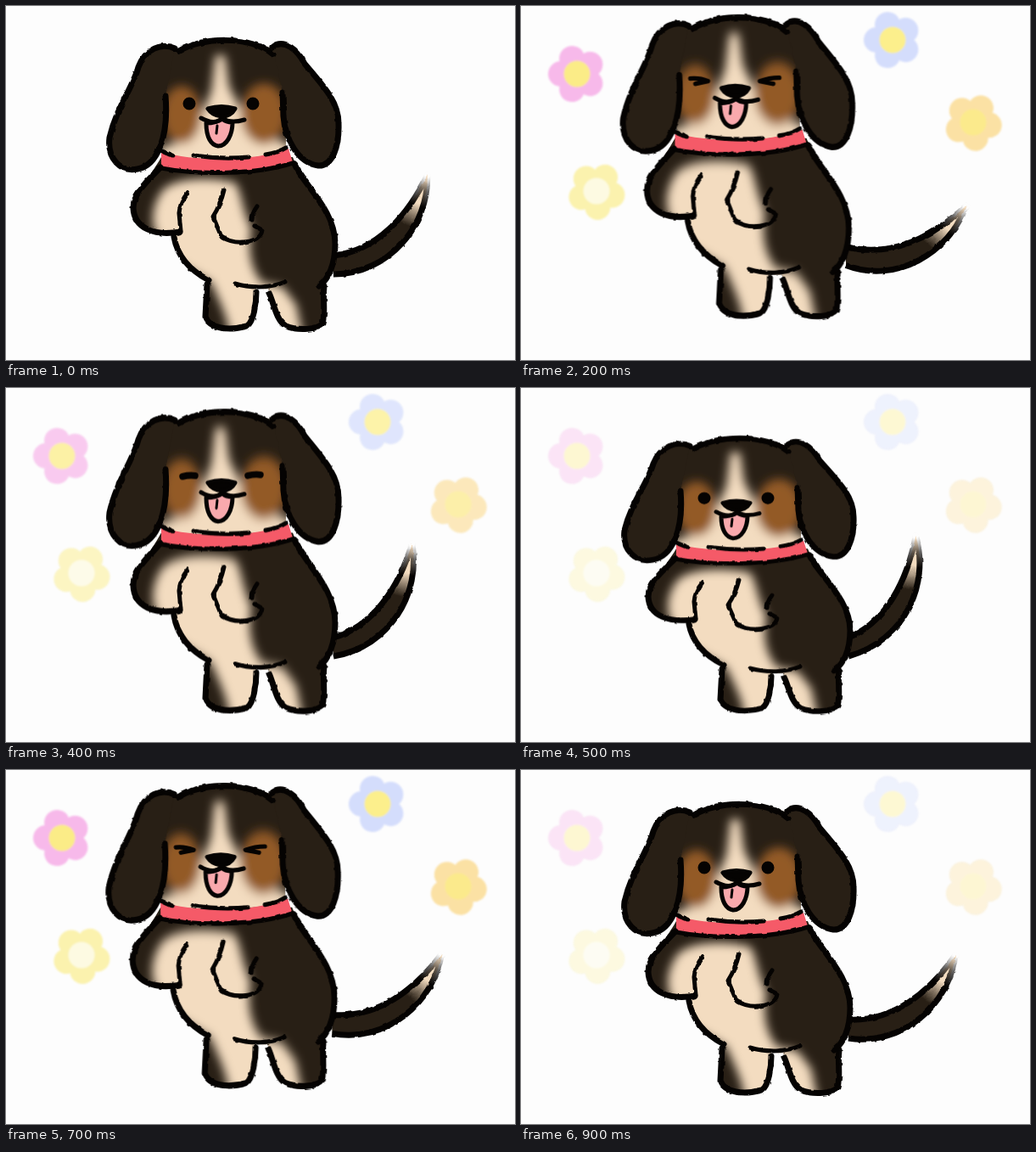
Recreate the animation shown at these times as an HTML page. Size 600 by 417 pixels, loop 1000 ms.

```html
<!DOCTYPE html>
<html lang="en">
<head>
<meta charset="utf-8">
<title>Happy puppy</title>
<style>
  html, body { margin: 0; height: 100%; overflow: hidden; background: #fdfdfd; }
  svg { display: block; width: 100vw; height: 100vh; }
  .ink { fill: none; stroke: #050302; stroke-width: 7; stroke-linecap: round; stroke-linejoin: round; }
  .thin { stroke-width: 5; }
  .dark { fill: #281f15; }
  .cream { fill: #f3dcc0; }
</style>
</head>
<body>
<svg viewBox="0 0 600 417" preserveAspectRatio="none">
  <defs>
    <filter id="rough" x="-10%" y="-10%" width="120%" height="120%" color-interpolation-filters="sRGB">
      <feTurbulence type="fractalNoise" baseFrequency=".12" numOctaves="2" seed="4"/>
      <feDisplacementMap in="SourceGraphic" scale="3" xChannelSelector="R" yChannelSelector="G"/>
    </filter>
    <filter id="soft" x="-30%" y="-30%" width="160%" height="160%"><feGaussianBlur stdDeviation="6"/></filter>
    <filter id="haze"><feGaussianBlur stdDeviation="1"/></filter>
    <radialGradient id="tipFill" gradientUnits="userSpaceOnUse" r="64">
      <stop offset=".55" stop-color="#f3dcc0"/><stop offset="1" stop-color="#281f15"/>
    </radialGradient>
    <radialGradient id="tipInk" gradientUnits="userSpaceOnUse" r="64">
      <stop offset=".05" stop-color="#050302" stop-opacity="0"/>
      <stop offset=".3" stop-color="#050302" stop-opacity=".6"/>
      <stop offset=".6" stop-color="#050302"/>
    </radialGradient>
    <clipPath id="bodyClip"><path id="bodyShape" d="M183 178C168 205 150 220 149 238C150 262 175 272 200 268C202 295 218 312 238 326L235 366C240 380 262 384 284 378C293 372 294 345 295 332Q302 334 309 333C316 350 318 370 330 378C345 384 368 382 374 374C378 360 374 340 376 326C385 310 388 300 388 280C388 240 350 210 338 178Z"/></clipPath>
    <clipPath id="headClip"><path id="headShape" d="M180 64C210 37 290 32 330 58L330 166C320 184 200 184 185 172Z"/></clipPath>
  </defs>

  <g id="flowers" filter="url(#haze)"></g>

  <path id="tail" fill="url(#tipFill)" stroke="url(#tipInk)" stroke-width="7" stroke-linejoin="round" filter="url(#rough)"/>

  <g id="dog">
    <use href="#bodyShape" class="dark"/>
    <g clip-path="url(#bodyClip)">
      <path class="cream" filter="url(#soft)" d="M184 218C198 202 240 201 270 208C278 220 278 240 289 262C284 290 290 312 302 326L326 331L342 352L350 390L264 390C262 366 250 345 242 326L190 296L176 266C170 250 174 232 184 218Z"/>
    </g>

    <use href="#headShape" class="dark"/>
    <g clip-path="url(#headClip)">
      <g filter="url(#soft)" fill="#935a28">
        <path class="cream" d="M247 58H258L263 95L280 128L300 150L340 166V192H180V168L205 160L226 138L242 100Z"/>
        <ellipse cx="207" cy="128" rx="23" ry="34"/>
        <ellipse cx="304" cy="127" rx="27" ry="36"/>
      </g>
    </g>

    <path fill="#f55a68" d="M183 172C225 184 295 183 333 168L338 184C295 199 225 199 183 190Z"/>

    <g filter="url(#rough)">
      <g class="ink">
        <path class="dark" d="M199 50C184 43 164 50 156 72C150 95 130 120 122 155C119 180 135 196 155 192C178 188 192 155 188 106"/>
        <path class="dark" d="M314 48C328 38 344 52 352 68C375 95 392 113 392 138C393 165 385 189 368 188C345 185 329 158 327 130L326 102"/>
        <path d="M204 53C230 37 286 34 315 57"/>
        <path d="M182 190C168 205 150 220 150 238C151 262 175 271 205 266M198 272C202 295 218 312 239 323"/>
        <path d="M237 328L235 366C240 380 262 383 284 377C292 372 295 350 295 337M310 338C316 350 318 370 330 377C345 383 368 381 373 374C377 360 373 345 375 330"/>
        <path d="M340 186C350 210 388 240 388 280C388 305 380 322 369 330"/>
      </g>
      <g class="ink thin">
        <path d="M183 191C225 199 295 199 338 185M221 176Q255 181 286 178M306 175Q320 173 330 167M182 170L196 176"/>
        <path d="M214 220Q205 231 204 244L206 265M257 217Q253 234 244 248L254 272C270 282 300 280 302 264L293 259M296 236Q290 244 290 252M270 327C290 333 312 332 329 325"/>
      </g>
    </g>

    <g class="ink thin">
      <path fill="#f9a9ad" d="M236 138C236 155 242 164 250 165C260 165 267 152 267 137Q259 137 255 133Q248 138 236 138Z"/>
      <path d="M230 132Q246 141 255 132Q264 139 281 134"/>
      <path d="M249 141L248 150" stroke-width="3"/>
      <path fill="#050302" d="M238 121Q254 116 270 121Q265 130 254 130Q243 129 238 121Z"/>
      <path id="eyes"/>
    </g>
  </g>
</svg>

<script>
const $ = id => document.getElementById(id);
const ground = 383;

function flower(x, y, turn, petal, middle) {
  let out = "";
  for (let a = turn; a < turn + 360; a += 72) {
    out += `<circle cx="19" r="15" fill="${petal}" transform="translate(${x} ${y}) rotate(${a})"/>`;
  }
  return out + `<circle cx="${x}" cy="${y}" r="15.5" fill="${middle}"/>`;
}
$("flowers").innerHTML =
  flower(66, 80, -108, "#f7b9ea", "#fbec87") +
  flower(438, 40, -108, "#d4ddfc", "#fcef8c") +
  flower(533, 137, -62, "#fbe1a4", "#fbea8c") +
  flower(89, 218, -58, "#fbf2ae", "#fdfae2");

const eyes = {
  open: { d: "M213 115a3 3 0 1 0 6 0a3 3 0 1 0-6 0m75 0a3 3 0 1 0 6 0a3 3 0 1 0-6 0", width: 9 },
  squeezed: { d: "M201 110Q212 109 222 113L207 116M306 109Q294 109 283 113L299 116", width: 5 },
  flat: { d: "M208 114Q216 112 223 113M285 113Q293 111 300 112", width: 7.5 }
};

const poses = {
  stand: { stretch: 1, lift: 0, look: "open" },
  rise: { stretch: 1.048, lift: 0, look: "squeezed" },
  hop: { stretch: 1.04, lift: 8, look: "squeezed" },
  jump: { stretch: 1.035, lift: 15, look: "squeezed" },
  land: { stretch: 1.036, lift: 0, look: "flat" },
  squash: { stretch: .945, lift: 0, look: "open" }
};

// pose, tail angle, flower opacity; each held for 100 ms
const steps = [
  ["stand", 44, 0], ["rise", 35, 1], ["jump", 23, 1], ["hop", 38, 1], ["land", 53, .75],
  ["squash", 59, .37], ["rise", 46, 1], ["hop", 33, 1], ["jump", 23, 1], ["stand", 35, .37]
];

// The whole tail curve swings about its root; only the root's ends stay put.
function drawTail(angle, lift) {
  const x = 386 - lift / 5, y = 306 - lift * .7;
  const at = (r, lag) => {
    const a = (lag - angle) * Math.PI / 180;
    return [x + r * Math.cos(a), y + r * Math.sin(a)];
  };
  const tip = at(154, 0);
  $("tail").setAttribute("d",
    `M${x} ${y - 12}C${at(54, 25)} ${at(106, 10)} ${tip}C${at(122, 21)} ${at(67, 52)} ${x} ${y + 10}`);
  for (const id of ["tipFill", "tipInk"]) {
    $(id).setAttribute("cx", tip[0]);
    $(id).setAttribute("cy", tip[1]);
  }
}

function draw(now) {
  const [name, angle, bloom] = steps[Math.floor(now % 1000 / 100)];
  const { stretch, lift, look } = poses[name];
  $("dog").setAttribute("transform",
    `translate(${-lift / 10} ${ground - lift}) scale(1 ${stretch}) translate(0 ${-ground})`);
  $("eyes").setAttribute("d", eyes[look].d);
  $("eyes").setAttribute("stroke-width", eyes[look].width);
  drawTail(angle, lift);
  $("flowers").setAttribute("opacity", bloom);
  requestAnimationFrame(draw);
}
requestAnimationFrame(draw);
</script>
</body>
</html>
```
